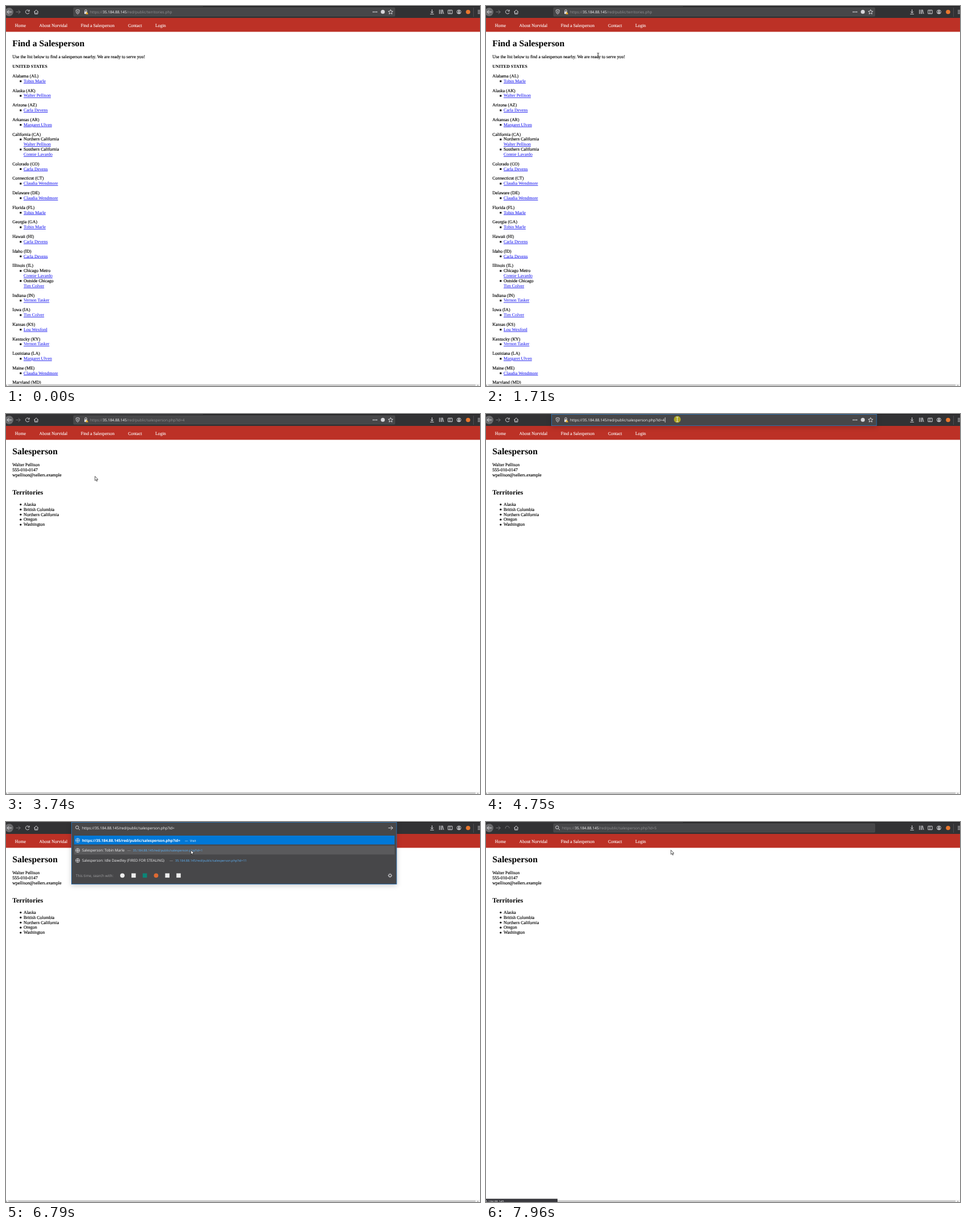
These frames come from a looping animation (835x670 px, 8000 ms). An HTML page:

```html
<!DOCTYPE html>
<html lang="en">
<head>
<meta charset="utf-8">
<title>Find a Salesperson</title>
<style>
  html, body { margin: 0; width: 100%; height: 100%; overflow: hidden; background: #fff; }
  svg { display: block; width: 835px; height: 670px; text-rendering: geometricPrecision; }
  text { white-space: pre; }
  .body, .link, .bold, .nav { font: 7.87px "Liberation Serif", serif; }
  .body { stroke: #000; stroke-width: .15px; }
  .bold { font-weight: 700; }
  .nav { fill: #fff; stroke: #fff; stroke-width: .1px; }
  .link { fill: #00e; text-decoration: underline; }
  .h1 { font: 700 15.75px "Liberation Serif", serif; }
  .h2 { font: 700 11.8px "Liberation Serif", serif; }
  .url { font: 6.53px "Open Sans", sans-serif; fill: #939395; }
  .url.on, .url .host { fill: #f9f9fa; }
  .row { font: 6.4px "Open Sans", sans-serif; fill: #f4f4f5; }
  .top { font: 700 6.55px "Open Sans", sans-serif; fill: #fff; }
  .addr { font: 5.55px "Open Sans", sans-serif; fill: #5cb0f5; }
  .dash { fill: #a5a5a7; }
  .find { fill: #30d312; }
  .visit { fill: #fff; }
  .hint { fill: #a0a0a2; }
  .status { font: 5.4px "Open Sans", sans-serif; fill: #f4f4f5; }
  .line { fill: none; stroke: #d7d7db; stroke-width: 1; }
  .dim { stroke: #77777a; }
  .box { fill: #474749; stroke: #2d6da8; }
  .drop { filter: drop-shadow(0 2px 4px rgba(0, 0, 0, .2)); }
</style>
</head>
<body>
<svg id="stage" viewBox="0 0 835 670"></svg>
<script>
const LOOP = 8000, LINE = 8.87, GAP = 7.91, ROW = 17.75;
const HOST = '35.184.88.145', PERSON = '/red/public/salesperson.php?id=';

const esc = s => s.replace(/&/g, '&amp;').replace(/</g, '&lt;');
const text = (x, y, s, cls = 'body') => `<text x="${x}" y="${y}" class="${cls}">${esc(s)}</text>`;
const rect = (x, y, w, h, fill, more = '') =>
  `<rect x="${x}" y="${y}" width="${w}" height="${h}" fill="${fill}" ${more}/>`;
const disc = (x, y, r, fill, more = '') => `<circle cx="${x}" cy="${y}" r="${r}" fill="${fill}" ${more}/>`;
const line = (d, cls = '') => `<path class="line ${cls}" d="${d}"/>`;
const group = (id, s) => `<g id="${id}">${s}</g>`;

// Territory list
const A = 'Tobin Marle', B = 'Walter Pellison', C = 'Carla Devens', D = 'Margaret Ulven',
  E = 'Connie Lavardo', F = 'Claudia Wendmore', G = 'Tim Colver', H = 'Vernon Tasker', I = 'Lou Wexford';
const states = [
  ['Alabama (AL)', A], ['Alaska (AK)', B], ['Arizona (AZ)', C], ['Arkansas (AR)', D],
  ['California (CA)', B, 'Northern California', E, 'Southern California'],
  ['Colorado (CO)', C], ['Connecticut (CT)', F], ['Delaware (DE)', F], ['Florida (FL)', A],
  ['Georgia (GA)', A], ['Hawaii (HI)', C], ['Idaho (ID)', C],
  ['Illinois (IL)', E, 'Chicago Metro', G, 'Outside Chicago'],
  ['Indiana (IN)', H], ['Iowa (IA)', G], ['Kansas (KS)', I], ['Kentucky (KY)', H],
  ['Louisiana (LA)', D], ['Maine (ME)', F], ['Maryland (MD)']
];

function territories() {
  let y = 125.9;
  let out = text(11.3, 71, 'Find a Salesperson', 'h1') +
    text(11.3, 92.4, 'Use the list below to find a salesperson nearby. We are ready to serve you!') +
    text(11.3, 109.1, 'UNITED STATES', 'bold');
  for (const [state, ...who] of states) {
    out += text(11.3, y, state);
    for (let i = 0; i < who.length; i += 2) {
      y += LINE;
      out += rect(24.3, y - 3.6, 3, 3, '#000');
      if (who[i + 1]) {
        out += text(31, y, who[i + 1]);
        y += LINE;
      }
      out += text(31, y, who[i], 'link');
    }
    y += LINE + GAP;
  }
  return out;
}

function salesperson() {
  const areas = ['Alaska', 'British Columbia', 'Northern California', 'Oregon', 'Washington'];
  return text(11.3, 71, 'Salesperson', 'h1') +
    [B, '555-010-0147', 'wpellison@sellers.example'].map((s, i) => text(11.3, 92.4 + i * LINE, s)).join('') +
    text(11.3, 142, 'Territories', 'h2') +
    areas.map((s, i) => {
      const y = 161.8 + i * LINE;
      return disc(25.8, y - 2.2, 1.6, '#000') + text(31, y, s);
    }).join('');
}

function toolbar() {
  return rect(0, 0, 835, 21, '#323234') + rect(347, 0, 488, 1, '#1c1c1e') +
    disc(5.5, 10.5, 7.5, '#6b6b6d') + line('M10 10.5H2M5.5 7L2 10.5L5.5 14') +
    line('M17.5 10.5H25M21.7 7L25.2 10.5L21.7 14', 'dim') +
    group('reload', line('M40.6 8.3A3.4 3.4 0 1 0 41 11.8M41.2 6.6V9.2H38.4')) +
    group('wait', line('M34.3 11.5A3.4 3.4 0 1 1 41 11', 'dim')) +
    line('M49.3 10.6L53.2 7L57.1 10.6M50.6 10V14H55.8V10M53.2 14V11.5') +
    line('M750.5 6V12M748 9.8L750.5 12.3L753 9.8M747.2 14.2H753.8') +
    line('M763.5 6.5V14M766 6.5V14M768 6.5V14M769 6.5L771 14') +
    line('M778.8 7.3H786V13.6H778.8ZM782 7.3V13.6') +
    line('M794.4 10.4A3.5 3.5 0 1 0 801.4 10.4A3.5 3.5 0 1 0 794.4 10.4') +
    disc(797.9, 9.4, 1.4, '#d7d7db') + rect(795.8, 11.2, 4.2, 1.6, '#d7d7db') +
    disc(814, 10.5, 3.8, '#e8772e') + rect(823, 3, .8, 16, '#55555a') +
    line('M831 7.8H835M831 10.5H835M831 13.2H835') +
    group('field', rect(119, 3, 566, 15, '#474749', 'rx="1" stroke="#555557" stroke-width=".6"'));
}

function navbar() {
  const items = [[15.8, 'Home'], [58.6, 'About Norvidal'], [131.8, 'Find a Salesperson'],
    [215, 'Contact'], [263, 'Login']];
  return rect(0, 21, 835, 24.5, '#bc3126') + items.map(([x, s]) => text(x, 36.5, s, 'nav')).join('');
}

// Address suggestions
const globe = y => disc(126.3, y, 3.5, 'none', 'class="line" style="stroke-width:.8"') +
  line(`M122.8 ${y}H129.8M126.3 ${y - 3.5}V${y + 3.5}`);
const square = fill => (y, x = 126.3) => rect(x - 3.8, y - 3.8, 7.6, 7.6, fill);
const round = fill => (y, x = 126.3) => disc(x, y, 3.9, fill);
const midRow = i => 32.3 + i * ROW;

function entry(i, icon, title, x, addr, cls = 'addr', head = 'row') {
  const y = midRow(i), base = y + 2.3;
  return icon(y) + text(134, base, title, head) +
    text(x - 10, base, '—', 'row dash') + text(x, base, addr, cls);
}

const folder = 'drive.google.com/drive/folders/1PBiTCPABLMrhgw_Am2j4b5ahcHXIts-s';
const recent = [
  [square('#eee'), '@merivo', 176.5, 'Search with Merivo.com', 'addr find'],
  [round('#2fa25a'), '2020-10-19 CST 412 Lecture and Office Hours - Tundle Drive', 335, folder],
  [round('#f4f4f4'), 'OWASP Security Shepherd', 226, 'security.codepath.com/index.jsp'],
  [round('#1479c9'), 'NVCTL - Sign In', 197.5, 'nvctl.pelm.com/signin/verify/pelm/question'],
  [globe, 'Salesperson: ' + A, 223.5, HOST + PERSON + 1],
  [globe, 'Dashboard ‹ Example Title — WordPress', 267.5, 'http://wpdistillery.vm/wp-admin/'],
  [round('#eee'), 'Tundle Drive: Sign-in', 210.5,
    `accounts.google.com/ServiceLogin?service=wise&passive=1209600&continue=https://${folder}&followup=https://drive`],
  [square('#8d8d90'), 'Course: CST412-01_FA20:Network Administration', 296.5, 'ilearn.nvctl.edu/course/view.php?id=23749']
];

function matches() {
  const engines = [round('#eee'), square('#eee'), square('#0b8577'), round('#de6a33'), square('#eee'), square('#eee')];
  return rect(120, 24, 564.5, 15.6, '#0078d7') + globe(midRow(0)) +
    `<text id="typed" x="134" y="34.6" class="top"></text>` +
    group('visit', text(315, 34.6, '—', 'addr visit') + text(324, 34.6, 'Visit', 'addr visit')) +
    group('others', entry(1, globe, 'Salesperson: ' + A, 223.5, HOST + PERSON + 1) +
      entry(2, globe, 'Salesperson: Idle Dawdley (FIRED FOR STEALING)', 298, HOST + PERSON + 11)) +
    group('engines', text(123, 96.9, 'This time, search with:', 'row hint') +
      engines.map((icon, i) => icon(94.3, 205 + i * 19.8)).join('') +
      disc(676.5, 94.3, 2.2, 'none', 'class="line"') +
      line('M676.5 90.5V92M676.5 96.6V98.1M672.7 94.3H674.2M678.8 94.3H680.3M673.8 91.6L674.9 92.7M678.1 95.9L679.2 97M673.8 97L674.9 95.9M678.1 92.7L679.2 91.6'));
}

const star = 'M677.5 6.3L678.7 9.1L681.6 9.3L679.4 11.3L680.1 14.2L677.5 12.6L674.9 14.2L675.6 11.3L673.4 9.3L676.3 9.1Z';

document.getElementById('stage').innerHTML =
  '<clipPath id="inside"><rect x="116" y="0" width="567.5" height="170"/></clipPath>' +
  rect(0, 0, 835, 670, '#fff') +
  group('list', territories()) + group('person', salesperson()) +
  rect(0, 666.3, 835, 4, '#f0f0f0') + rect(4, 667, 823, 3, '#cbcbcb') +
  rect(0, 668, 1.5, 1.5, '#888') + rect(830.5, 668, 1.5, 1.5, '#888') +
  group('status', rect(0, 664.3, 0, 6, '#38383d', 'id="plate"') +
    '<text id="statusText" y="670.6" class="status"></text>') +
  navbar() + toolbar() +
  group('focus', '<rect id="box" class="box drop" x="115.5" y=".5" width="572.5"/>') +
  rect(120, 0, 564.5, 15.6, '#5a5a5c', 'id="hover"') +
  group('recent', rect(120, 22, 564, .5, '#5c5c5e') +
    `<g clip-path="url(#inside)">${recent.map((r, i) => entry(i, ...r)).join('')}</g>`) +
  group('matches', matches()) +
  group('site',
    line('M123.4 7.2L126.3 6.4L129.2 7.2C129.2 10.8 128.4 13 126.3 14.2C124.2 13 123.4 10.8 123.4 7.2ZM126.3 8.2V12') +
    rect(138, 9.5, 5, 4.5, '#d7d7db') + line('M139 9.5V8A1.6 1.6 0 0 1 142.2 8V9.5') +
    '<path fill="#f0b429" d="M142.6 10L145 14.4H140.2Z"/>' +
    [647, 650, 653].map(x => disc(x, 10.5, 1.1, '#d7d7db')).join('') +
    disc(663.8, 10.3, 3.5, '#d7d7db') + line(star)) +
  group('lens', line('M122.6 9.5A2.7 2.7 0 1 0 128 9.5A2.7 2.7 0 1 0 122.6 9.5M127.3 11.5L130 14.2')) +
  group('go', line('M673.5 10.5H681M677.8 7L681.3 10.5L677.8 14')) +
  rect(148, 5, 167.5, 11, '#0078d7', 'id="selection"') +
  '<text id="url" y="13.1"><tspan id="scheme">https://</tspan><tspan class="host">' + HOST +
  '</tspan><tspan id="path"></tspan></text>' +
  rect(315.4, 6, .7, 9, '#fff', 'id="caret"') +
  group('pointer', disc(0, 0, 6, '#c8bf1c', 'id="press" opacity=".8"') +
    group('beam', line('M-1.8 -4H-.4L0 -3.6L.4 -4H1.8M0 -3.6V3.6M-1.8 4H-.4L0 3.6L.4 4H1.8')) +
    group('arrow', '<path d="M0 0V7.6L1.8 6L3 8.8L4.2 8.2L3 5.6H5.3Z" fill="#fff" stroke="#111" stroke-width=".7"/>') +
    group('hand', '<path d="M-1.6 -3.8Q-.8 -4.8 0 -3.8V-.6L3.2 .2Q4.2 .6 4 1.8L3.2 5.2H-1.2L-3.6 1.8Q-3.8 .6 -2.6 .8L-1.6 1.8Z" fill="#fff" stroke="#111" stroke-width=".7"/>'));

const el = {};
document.querySelectorAll('#stage [id]').forEach(n => el[n.id] = n);
const show = (id, on) => el[id].style.display = on ? '' : 'none';
const put = (id, attrs) => { for (const k in attrs) el[id].setAttribute(k, attrs[k]); };

// Pointer path: time, x, y
const path = [
  [460, 1, 300], [850, 14, 106], [1240, 80, 110], [1560, 214, 76], [1800, 190, 92], [2140, 172, 97],
  [2420, 81, 162.5], [3190, 81, 162.5], [3980, 178, 95], [4050, 178, 95], [4600, 337, 9.5],
  [5850, 338, 10], [6400, 325.8, 49.5], [LOOP, 325.8, 49.5]
];

function pointerAt(t) {
  const i = Math.max(1, path.findIndex(p => p[0] > t));
  const [t0, x0, y0] = path[i - 1], [t1, x1, y1] = path[i];
  const k = Math.max(0, (t - t0) / (t1 - t0)), e = k * k * (3 - 2 * k);
  return [x0 + (x1 - x0) * e, y0 + (y1 - y0) * e];
}

function draw(t) {
  const within = (a, b) => t >= a && t < b;
  const onList = t < 3270;
  const focused = within(4600, 7880), open = within(4830, 7880);
  const searching = t >= 6790, short = t >= 7410;
  const id = t >= 7180 ? '5' : searching ? '' : '4';

  show('list', onList);
  show('person', !onList);

  const loading = within(3190, 3700) || t >= 7880;
  show('reload', !loading);
  show('wait', loading);

  const linked = within(2570, 3190);
  show('status', linked || within(3190, 3500) || t >= 7880);
  el.statusText.textContent = linked ? 'https://' + HOST + PERSON + 4 : HOST;
  put('statusText', { x: linked ? 2 : -3.5 });
  put('plate', { width: linked ? 145 : 126 });

  // Address field
  show('focus', focused);
  show('field', !focused);
  put('box', { height: !open ? 20 : !searching ? 165.5 : short ? 73.5 : 109 });
  show('site', !searching);
  show('lens', searching);
  show('go', searching && focused);
  put('url', { x: searching ? 134 : 148, class: focused ? 'url on' : 'url' });
  el.path.textContent = onList ? '/red/public/territories.php' : PERSON + id;
  show('selection', within(4830, 5300));
  show('caret', within(4600, 4830));

  show('recent', open && !searching);
  show('matches', open && searching);
  show('others', !short);
  put('engines', { transform: `translate(0 ${short ? -2 * ROW : 0})` });
  const late = t >= 7250;
  el.typed.textContent = 'https://' + HOST + PERSON + (late ? '5' : '');
  put('visit', { transform: `translate(${late ? 4 : 0} 0)` });

  const [x, y] = pointerAt(t);
  const row = Math.floor((y - 23.5) / ROW);
  show('hover', open && !short && row >= 0);
  put('hover', { y: 24 + Math.max(0, row) * ROW });

  const beam = within(700, 2300) || within(4480, 6000), hand = within(2330, 3350);
  show('pointer', t >= 460);
  put('pointer', { transform: `translate(${x.toFixed(2)} ${y.toFixed(2)})` });
  show('press', within(4670, 4830) || within(5300, 5380));
  show('beam', beam);
  show('hand', hand);
  show('arrow', !beam && !hand);
  el.beam.firstChild.style.stroke = t > 4000 ? '#e8e8e8' : '#333';
}

const start = performance.now();
function tick() {
  draw((performance.now() - start) % LOOP);
  requestAnimationFrame(tick);
}
tick();
</script>
</body>
</html>
```
